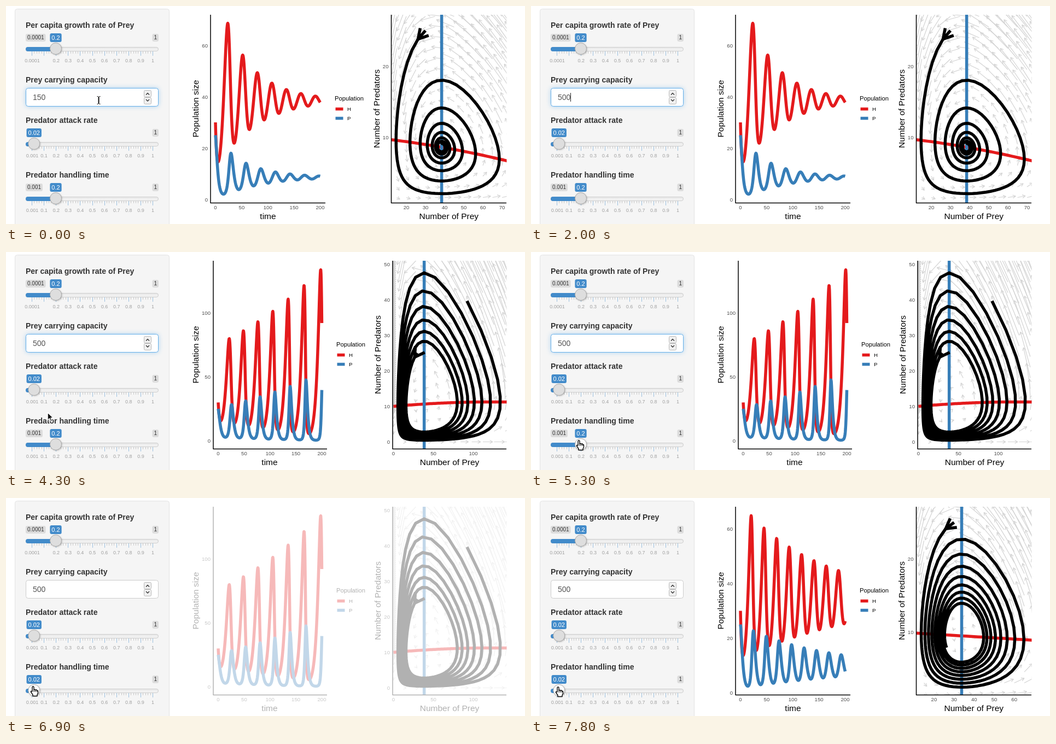
Write an HTML page with a canvas that moves like this. It is 949 px wide and 399 px high and loops after 9.2 s.

```html
<!DOCTYPE html>
<html lang="en">
<head>
<meta charset="utf-8">
<title>Predator and prey</title>
<style>
html, body { margin: 0; width: 100%; height: 100%; overflow: hidden; background: #fff; }
canvas { display: block; width: 949px; height: 399px; }
</style>
</head>
<body>
<canvas id="stage" width="949" height="399"></canvas>
<script>
const W = 949, H = 399, LOOP = 9200;
const RED = '#e41a1c', BLUE = '#377eb8', ACCENT = '#428bca';
const FONT = '"Liberation Sans", Arial, sans-serif';
const screen2d = document.getElementById('stage').getContext('2d');
let g = screen2d;

function text(s, x, y, size, color, align = 'left', weight = '') {
  g.font = `${weight} ${size}px ${FONT}`;
  g.fillStyle = color;
  g.textAlign = align;
  g.fillText(s, x, y);
}
function upText(s, x, y, size) {
  g.save();
  g.translate(x, y);
  g.rotate(-Math.PI / 2);
  text(s, 0, 0, size, '#000', 'center');
  g.restore();
}
function line(points, color, width) {
  g.beginPath();
  points.forEach(([x, y], i) => i ? g.lineTo(x, y) : g.moveTo(x, y));
  g.strokeStyle = color;
  g.lineWidth = width;
  g.stroke();
}
function box(x, y, w, h, r, fill, stroke) {
  g.beginPath();
  g.roundRect(x, y, w, h, r);
  if (fill) { g.fillStyle = fill; g.fill(); }
  if (stroke) { g.strokeStyle = stroke; g.lineWidth = 1; g.stroke(); }
}

// ---- population model ----
const growth = 0.2, attack = 0.02, gain = 0.6, death = 0.4;

function rates(m, h, p) {
  const eaten = attack * h / (1 + attack * m.handling * h);
  return [growth * h * (1 - h / m.capacity) - eaten * p, p * (gain * eaten - death)];
}
function rk4(m, h, p, dt) {
  const a = rates(m, h, p);
  const b = rates(m, h + a[0] * dt / 2, p + a[1] * dt / 2);
  const c = rates(m, h + b[0] * dt / 2, p + b[1] * dt / 2);
  const d = rates(m, h + c[0] * dt, p + c[1] * dt);
  const mix = i => (a[i] + 2 * b[i] + 2 * c[i] + d[i]) * dt / 6;
  return [h + mix(0), p + mix(1)];
}
function simulate(m) {
  let s = [30, 25];
  const run = [s];
  for (let i = 0; i < 400; i++) {
    for (let k = 0; k < 5; k++) s = rk4(m, s[0], s[1], 0.1);
    run.push(s);
  }
  return run;
}

// ---- plots: each axis is [pixel of zero, pixels per unit] ----
const at = (axis, v) => axis[0] + axis[1] * v;

const damped = {
  capacity: 150, handling: 0.2,
  left: 374, right: 584, timeX: [383, 0.9575], popY: [354, -4.7], popStep: 20, popMax: 60,
  title: 479, legend: 601,
  phase: 704.5, preyX: [662, 3.5], predY: [370, -13],
  preyTicks: [20, 30, 40, 50, 60, 70], predTicks: [10, 20], cell: [5, 1.5]
};
const growing = {
  capacity: 500, handling: 0.2,
  left: 379, right: 587, timeX: [388, 0.9475], popY: [345.5, -2.34], popStep: 50, popMax: 100,
  title: 482, legend: 604,
  phase: 707, preyX: [708.5, 1.46], predY: [347.5, -6.5],
  preyTicks: [0, 50, 100], predTicks: [0, 10, 20, 30, 40, 50], cell: [14, 3]
};
const slow = {
  ...damped, capacity: 500, handling: 0.02,
  popY: [356.5, -5], preyX: [663.5, 3.67], predY: [378.5, -13.35],
  preyTicks: [20, 30, 40, 50, 60], cell: [5, 1.5]
};

function arrowHead(x0, y0, x1, y1, len, color, width) {
  const back = Math.atan2(y0 - y1, x0 - x1);
  const arm = k => [x1 + len * Math.cos(back + k), y1 + len * Math.sin(back + k)];
  line([arm(-Math.PI / 6), [x1, y1], arm(Math.PI / 6)], color, width);
}

function drawField(m) {
  const [dx, dy] = m.cell, grey = '#d3d3d3', scale = 0.7;
  for (let i = 0; i < 20; i++) for (let j = 0; j < 26; j++) {
    const h = i * dx, p = j * dy;
    const [vh, vp] = rates(m, h, p);
    const x0 = at(m.preyX, h), y0 = at(m.predY, p);
    const x1 = at(m.preyX, h + vh * scale), y1 = at(m.predY, p + vp * scale);
    if (Math.hypot(x1 - x0, y1 - y0) < 0.5) continue;
    line([[x0, y0], [x1, y1]], grey, 1.2);
    arrowHead(x0, y0, x1, y1, 6, grey, 1.2);
  }
  // dense falling arrows where there is no prey
  const x = at(m.preyX, 0);
  if (x > m.phase) for (let y = 20; y < 300; y += 4) arrowHead(x, y - 8, x, y, 8, grey, 2);
}

function drawSeries(m, run) {
  [[0, RED], [1, BLUE]].forEach(([k, color]) =>
    line(run.map((s, i) => [at(m.timeX, i / 2), at(m.popY, s[k])]), color, 5.5));
  line([[m.left, 16], [m.left, 360.5], [m.right, 360.5]], '#000', 1.5);
  for (let v = 0; v <= m.popMax; v += m.popStep)
    text(v, m.left - 5, at(m.popY, v) + 3.5, 9.6, '#4d4d4d', 'right');
  for (let v = 0; v <= 200; v += 50)
    text(v, at(m.timeX, v), 372, 9.6, '#4d4d4d', 'center');
  text('time', m.title, 390, 15.5, '#000', 'center');
  upText('Population size', 351.5, 188, 15.5);

  const x = m.legend;
  text('Population', x, 173, 11.2, '#000');
  [['H', RED, 188.5], ['P', BLUE, 205.5]].forEach(([name, color, y]) => {
    line([[x + 1.5, y], [x + 15.5, y]], color, 5.5);
    text(name, x + 23, y + 3.5, 9.6, '#000');
  });
}

function drawPhase(m, run) {
  const px = run.map(([h, p]) => [at(m.preyX, h), at(m.predY, p)]);
  g.save();
  g.beginPath();
  g.rect(m.phase, 16, 915.5 - m.phase, 344);
  g.clip();
  drawField(m);
  const iso = [];
  for (let h = 0; h <= 150; h += 2)
    iso.push([at(m.preyX, h), at(m.predY,
      growth / attack * (1 - h / m.capacity) * (1 + attack * m.handling * h))]);
  line(iso, RED, 5.5);
  const rest = at(m.preyX, 1 / (attack * (gain / death - m.handling)));
  line([[rest, 16], [rest, 360]], BLUE, 5.5);
  line(px, '#000', 5.5);
  arrowHead(...px[0], ...px[1], 20.5, '#000', 5.5);
  g.restore();

  line([[m.phase, 16], [m.phase, 360.5], [915, 360.5]], '#000', 1.5);
  m.preyTicks.forEach(v => text(v, at(m.preyX, v), 372, 9.6, '#4d4d4d', 'center'));
  m.predTicks.forEach(v => text(v, m.phase - 5, at(m.predY, v) + 3.5, 9.6, '#4d4d4d', 'right'));
  text('Number of Prey', (m.phase + 915) / 2, 390, 15.5, '#000', 'center');
  upText('Number of Predators', m.phase - 22, 188, 15.5);
}

function plotImage(m) {
  const c = document.createElement('canvas');
  c.width = W;
  c.height = H;
  g = c.getContext('2d');
  g.lineJoin = 'round';
  const run = simulate(m);
  drawSeries(m, run);
  drawPhase(m, run);
  g = screen2d;
  return c;
}
const images = [damped, growing, slow].map(plotImage);

// ---- controls ----
const knobX = v => 46.8 + 221 * v;

function slider(y, label, min, value, firstTick, hot) {
  text(label, 36, y + 40, 14, '#333', 'left', 'bold');
  const x = knobX(value), shown = String(value);
  g.font = `11px ${FONT}`;
  const w = g.measureText(shown).width + 6;
  g.font = `10px ${FONT}`;
  const minW = g.measureText(min).width + 6;
  if (x - w / 2 > 36 + minW) {
    box(36, y + 51, minW, 14, 3, '#dcdcdc');
    text(min, 39, y + 61, 10, '#333');
  }
  box(267.5, y + 51, 11.5, 14, 3, '#dcdcdc');
  text('1', 273.2, y + 61, 10, '#333', 'center');
  box(x - w / 2, y + 50, w, 16, 3, ACCENT);
  text(shown, x, y + 62, 11, '#fff', 'center');

  const shade = g.createLinearGradient(0, y + 71, 0, y + 87);
  shade.addColorStop(0, '#dedede');
  shade.addColorStop(1, '#fff');
  box(36.5, y + 75.5, 242, 7, 4, shade, '#ccc');
  box(36, y + 75, x - 36, 8, [4, 0, 0, 4], ACCENT);

  for (let i = 0; i <= 50; i++) {
    const big = i % 5 === 0;
    g.fillStyle = big ? '#9cc0df' : '#c8c8c8';
    g.fillRect(Math.round(47 + i * 4.42), y + 83, 1, big ? 8 : 4);
  }
  text(min, 48, y + 103, 9, '#a0a0a0', 'center');
  for (let k = firstTick; k <= 10; k++)
    text(String(k / 10), 47.5 + 22.1 * k, y + 103, 9, '#a0a0a0', 'center');

  g.save();
  g.shadowColor = 'rgba(0,0,0,.25)';
  g.shadowBlur = 3;
  g.shadowOffsetX = g.shadowOffsetY = 1;
  g.beginPath();
  g.arc(x, y + 78, 10.5, 0, 7);
  g.fillStyle = hot ? '#fff' : '#dedede';
  g.fill();
  g.restore();
  g.strokeStyle = '#aaa';
  g.lineWidth = 1;
  g.stroke();
}

function numberInput(value, focus, caret, selected) {
  text('Prey carrying capacity', 36, 140, 14, '#333', 'left', 'bold');
  g.save();
  if (focus) {
    g.shadowColor = 'rgba(102,175,233,.6)';
    g.shadowBlur = 8;
  }
  box(36.5, 150.5, 242, 33, 4, '#fff');
  g.restore();
  box(36.5, 150.5, 242, 33, 4, null, focus ? '#66afe9' : '#ccc');
  if (selected) {
    g.fillStyle = '#3297fd';
    g.fillRect(49, 159, 23.4, 17);
  }
  text(value, 49, 172, 14, selected ? '#fff' : '#555');
  if (caret) {
    const x = 49 + g.measureText(value).width;
    g.fillStyle = '#222';
    g.fillRect(Math.round(x), 159, 1, 16);
  }
  box(252.5, 154.5, 13, 12, 2, '#f0f0f0', '#b8b8b8');
  box(252.5, 167.5, 13, 12, 2, '#f0f0f0', '#b8b8b8');
  line([[256, 162.5], [259, 159.5], [262, 162.5]], '#333', 1.4);
  line([[256, 171], [259, 174], [262, 171]], '#333', 1.4);
}

// ---- pointers ----
function beam(x, y) {
  const bars = [[-2.5, -7, 2, 1], [1.5, -7, 2, 1], [-0.5, -6, 2, 13], [-2.5, 7, 2, 1], [1.5, 7, 2, 1]];
  g.fillStyle = '#fff';
  bars.forEach(([a, b, w, h]) => g.fillRect(x + a - 1, y + b - 1, w + 2, h + 2));
  g.fillStyle = '#111';
  bars.forEach(([a, b, w, h]) => g.fillRect(x + a, y + b, w, h));
}
function shape(x, y, d, fill, stroke) {
  g.save();
  g.translate(x, y);
  const p = new Path2D(d);
  g.lineJoin = 'round';
  g.lineWidth = 1.4;
  g.fillStyle = fill;
  g.strokeStyle = stroke;
  g.fill(p);
  g.stroke(p);
  g.restore();
}
const arrow = (x, y) =>
  shape(x, y, 'M0 0V14L3.5 11L6 16.5L8.5 15.5L6 10H10.5Z', '#111', '#fff');
function hand(x, y) {
  shape(x, y, 'M-4 -6Q-2.5 -8.5 -1 -6V-1L1 -1.5L2 -.5L4 -1L5 .5L6.5 1V5L5 8V10.5H-3V8L-6.5 3Q-7 .5 -4 2Z',
    '#fff', '#000');
  line([[-1, -1], [-1, 3]].map(([a, b]) => [x + a, y + b]), '#000', 1);
  line([[1.7, 0], [1.7, 3]].map(([a, b]) => [x + a, y + b]), '#000', 1);
  line([[4.4, 0], [4.4, 3]].map(([a, b]) => [x + a, y + b]), '#000', 1);
}

// value of the last [time, value] pair already reached
const step = (t, pairs) => pairs.reduce((v, p) => t >= p[0] ? p[1] : v, null);

function drawPointer(t, handling) {
  if (t < 900) {
    const x = step(t, [[0, 169], [200, 164], [300, 158], [400, 153], [500, 150]]);
    beam(x, t < 300 ? 172 : 173);
  } else if (t >= 3900 && t < 4600) {
    const k = (Math.floor((t - 3900) / 100) + 1) / 8;
    const e = k * k * (3 - 2 * k);
    const x = 46 + 44 * e, y = 168 + 184 * e;
    if (y < 184) beam(Math.round(x), Math.round(y));
    else if (y < 341) arrow(x, y);
    else hand(x, y);
  } else if (t >= 4600) {
    hand(Math.round(knobX(handling)) + (t < 5400 ? -1 : 1), t < 7800 ? 352 : 353);
  }
}

function draw(t) {
  g.clearRect(0, 0, W, H);
  g.fillStyle = '#fff';
  g.fillRect(0, 0, W, H);
  box(16.5, 5.5, 282, 420, 4, '#f5f5f5', '#e3e3e3');

  const handling = step(t, [[0, 0.2], [5400, 0.18], [5500, 0.15], [5900, 0.03], [6700, 0.02]]);
  const value = step(t, [[0, '150'], [1700, ''], [1800, '5'], [1900, '50'], [2000, '500']]);
  const caret = t >= 500 && t < 700 || t >= 1700 && t < 3400;
  slider(0, 'Per capita growth rate of Prey', '0.0001', 0.2, 2);
  numberInput(value, t < 5400, caret, t >= 700 && t < 1700);
  slider(174, 'Predator attack rate', '0.001', 0.02, 1);
  slider(274, 'Predator handling time', '0.001', handling, 1, t >= 4600);

  g.globalAlpha = step(t, [[0, 1], [6800, 0.65], [6900, 0.3], [7300, 0.7], [7400, 1]]);
  g.drawImage(images[step(t, [[0, 0], [3400, 1], [7300, 2]])], 0, 0);
  g.globalAlpha = 1;
  drawPointer(t, handling);
}

const start = performance.now();
function tick() {
  draw((performance.now() - start) % LOOP);
  requestAnimationFrame(tick);
}
tick();
</script>
</body>
</html>
```
